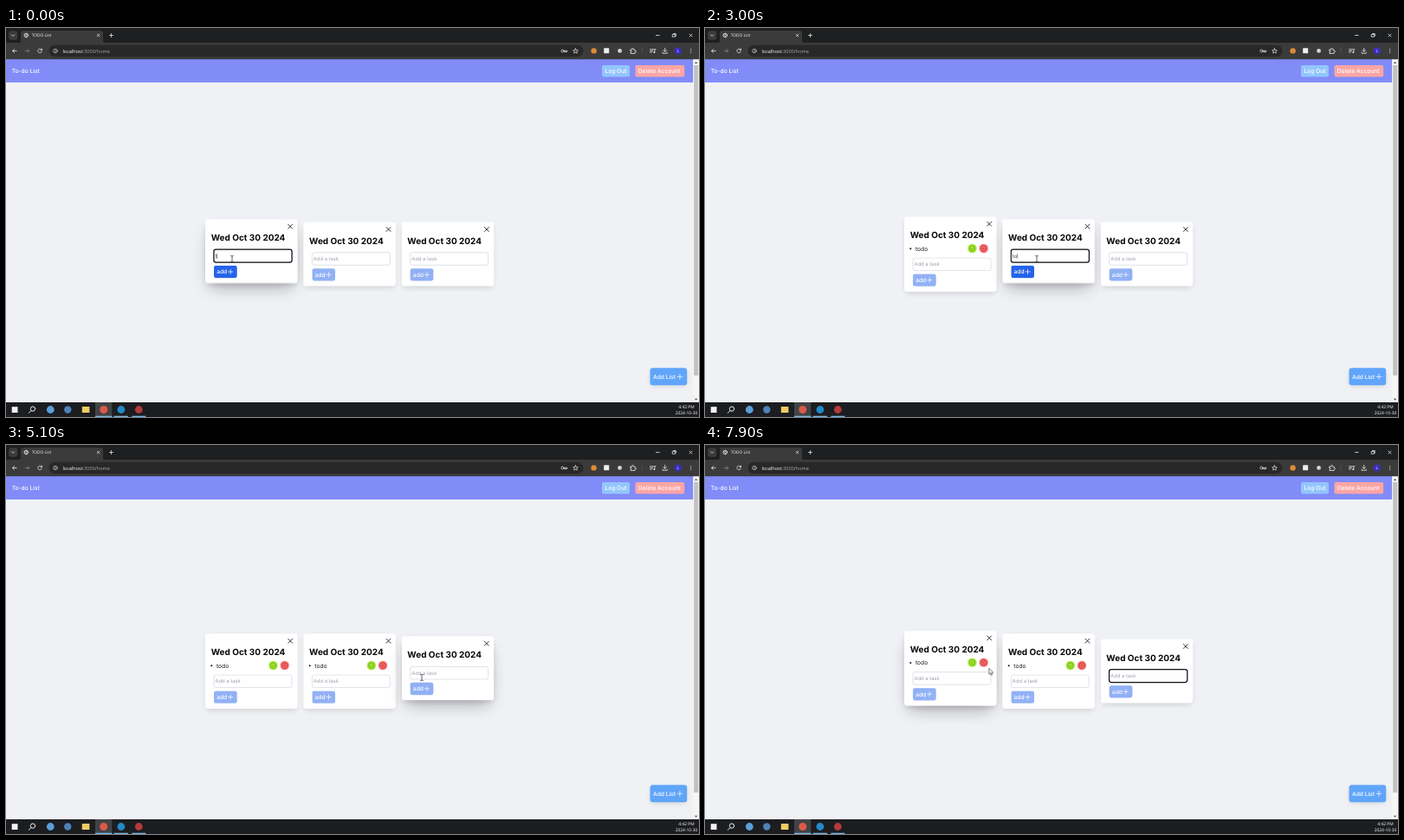
Recreate the animation shown at these times as an HTML page. Size 800 by 450 pixels, loop 8 s.

```html
<!DOCTYPE html>
<html lang="en">
<head>
<meta charset="utf-8">
<title>TODO List</title>
<style>
html, body { margin: 0; width: 100%; height: 100%; overflow: hidden; background: #eff1f5; }
svg { display: block; width: 800px; height: 450px; }
text { font: 500 6.67px Inter, sans-serif; fill: #fff; text-rendering: geometricPrecision; }
.ui text { font: 5px "Open Sans", sans-serif; }
.ui .url { font-size: 5.56px; }
.line { fill: none; stroke: #e8e8e8; stroke-width: .8; stroke-linecap: round; stroke-linejoin: round; }
.title { font-size: 10px; font-weight: 700; fill: #08080c; }
.hint, .typed { font-size: 5.83px; font-weight: 400; fill: #9ca3af; }
.typed { fill: #3a3f48; }
.item text { fill: #15151a; font-weight: 400; }
.soft { filter: blur(3px); opacity: .13; }
.deep { filter: blur(9.5px); opacity: .27; }
.cross { fill: none; stroke: #111; stroke-width: .85; }
.plus { fill: none; stroke: #fff; stroke-width: .7; }
.hidden { visibility: hidden; }
</style>
</head>
<body>
<svg viewBox="0 0 800 450">
  <rect width="800" height="450" fill="#eff1f5"/>

  <!-- page header -->
  <rect y="36" width="793.3" height="27" fill="#818cf8"/>
  <text x="6.7" y="52.1">To-do List</text>
  <rect x="688" y="43" width="32" height="13.5" rx="2" fill="#93c5fd"/>
  <text x="691.4" y="52.1" font-weight="600">Log Out</text>
  <rect x="726.5" y="43" width="56.7" height="13.5" rx="2" fill="#fca5a5"/>
  <text x="729.8" y="52.1" font-weight="600">Delete Account</text>

  <g id="cards"></g>

  <rect x="744.5" y="397" width="41" height="17" rx="3" class="soft"/>
  <rect x="743.5" y="393.3" width="42.7" height="20" rx="3" fill="#60a5fa"/>
  <text x="747" y="405.8">Add List</text>
  <path class="plus" d="M774.6 403.3h6.6m-3.3-3.3v6.6"/>

  <!-- scrollbar -->
  <rect x="793.3" y="36" width="6.7" height="397" fill="#f5f5f5"/>
  <rect x="794.2" y="43" width="5" height="359" fill="#c1c1c1"/>
  <path d="M794.8 41h3.6l-1.8-2zM794.8 428.8h3.6l-1.8 2z" fill="#555"/>

  <!-- browser frame -->
  <g class="ui">
    <rect width="800" height="18" fill="#1e1f20"/>
    <rect x="3" y="3.3" width="10.4" height="10.4" rx="3" fill="#3b3b3c"/>
    <path class="line" d="M6.6 7.8l1.6 1.6 1.6-1.6"/>
    <path d="M14 17.5q3-.2 3-3v-8.500q0-3 3-3h89q3 0 3 3v8.500q0 2.800 3 3z" fill="#3b3b3c"/>
    <g class="line" stroke-width=".7">
      <circle cx="23.300" cy="8.500" r="2.300"/>
      <path d="M21.200 7.700l2 1 .4 1.800m-.4-4.200l.6 1.500 1.500.2"/>
    </g>
    <text x="29.800" y="10.300" style="font-size:4.800px">TODO List</text>
    <path class="line" d="M105.300 7.200l2.600 2.600m0-2.600l-2.600 2.600M119.500 8.500h4m-2-2v4"/>
    <path class="line" d="M750.500 8.500h3.600M789 7l3 3m0-3l-3 3M769.600 7.400h2.800v2.800h-2.800zM770.500 6.500h2.800v2.800"/>

    <rect y="17" width="800" height="19.200" fill="#3b3b3c"/>
    <rect x="49.500" y="19.700" width="617" height="13.600" rx="6.800" fill="#282829"/>
    <path class="line" d="M12.200 26.500h-4.600m2-2l-2 2 2 2M41.200 25.300a2.300 2.300 0 1 0 .1 2m.2-3.200v1.500h-1.500"/>
    <path class="line" style="stroke:#858585" d="M22.200 26.500h4.600m-2-2l2 2-2 2"/>
    <circle class="line" cx="57" cy="26.500" r="2.300" style="stroke-width:.6"/>
    <path class="line" style="stroke-width:.6" d="M57 26.300v1.300m0-2.400v.1"/>
    <text class="url" x="65.400" y="28.500">localhost<tspan fill="#a9a9a9">:3000/home</tspan></text>

    <g class="line" style="stroke-width:.7">
      <circle cx="642.300" cy="26.500" r="1.500"/>
      <path d="M643.900 26.200h4v1.200h-4m2 0v.8"/>
      <path d="M657.500 23.700l.8 1.900 2 .2-1.500 1.300.5 2-1.800-1-1.800 1 .5-2-1.500-1.300 2-.2z"/>
    </g>
    <circle cx="678.600" cy="26.400" r="3.200" fill="#dd8b38"/>
    <rect x="690.200" y="23.300" width="6" height="6" rx=".6" fill="#eee"/>
    <circle cx="708.600" cy="26.400" r="2.400" fill="#d6d6d6"/>
    <path class="line" d="M721 25h1.700q-.3-1.600.8-1.600t.8 1.600h1.700v1.400q1.400-.2 1.400.9t-1.400.9v1.300h-5v-1.500q1.300 0 1.300-.8t-1.300-.8z"/>
    <path d="M734.300 23v7" stroke="#68686a" stroke-width=".5"/>
    <path class="line" d="M743.600 24.700h4m-4 1.700h3m-3 1.700h1.800m3.500-3.400v3.400m0-3.400h1"/>
    <circle cx="748.200" cy="28.200" r=".9" fill="#e8e8e8"/>
    <path class="line" d="M760.700 23.300v4m-1.800-1.700l1.800 1.800 1.800-1.800m-4.400 2.500v1.200h5.200v-1.200"/>
    <circle cx="775.700" cy="26.400" r="3.900" fill="#3b2fc4"/>
    <text x="774.600" y="28.100" style="font-size:4.500px">L</text>
    <path d="M790.700 24.300v.01m0 2.100v.01m0 2.100v.01" stroke="#eee" stroke-width="1.100" stroke-linecap="round"/>

    <!-- taskbar -->
    <rect y="433" width="800" height="17" fill="#1c1d20"/>
    <rect x="103" y="433" width="19.300" height="17" fill="#414346"/>
    <path d="M103 449.300h19.300M124.500 449.300h16.500M145.500 449.300h15.800" stroke="#76b9ed" stroke-width="1.200"/>
    <rect x="6.700" y="438.200" width="6.800" height="6.800" fill="#f2f2f2"/>
    <circle class="line" cx="31" cy="440.600" r="2.700" style="stroke-width:1"/>
    <path class="line" d="M29 442.600l-2.600 2.700" style="stroke-width:1"/>
    <circle cx="51.300" cy="441.500" r="4.400" fill="#5b9fd8"/>
    <circle cx="71.300" cy="441.500" r="4.200" fill="#4f81b8"/>
    <rect x="87.800" y="438" width="8.600" height="7" fill="#f1cc65"/>
    <circle cx="112.800" cy="441.500" r="4.500" fill="#dc5a49"/>
    <circle cx="132.900" cy="441.500" r="4.400" fill="#2489ca"/>
    <circle cx="153.300" cy="441.500" r="4.400" fill="#b53a3b"/>
    <text x="785.500" y="439.700" text-anchor="middle" style="font-size:4.900px">4:42 PM</text>
    <text x="785.500" y="447.300" text-anchor="middle" style="font-size:4.900px">2024-10-30</text>
  </g>

  <g id="pointer">
    <g id="beam" fill="none" stroke-linecap="round">
      <path d="M-1.500-3.700q1.500 0 1.500.8v5.800q0 .8-1.500.8m3-7.400q-1.500 0-1.500.8m0 5.800q0 .8 1.500.8" stroke="#33343a" stroke-width=".75"/>
    </g>
    <path id="hand" class="hidden" fill="#fff" stroke="#15151a" stroke-width=".65" stroke-linejoin="round"
      d="M-.8.600Q0-.600.800.600V3.300L2.100 3.500 3.400 3.900 4.500 4.500V6.500L3.500 9H-.700L-2.900 5.700Q-2.700 4.400-.800 5.800Z"/>
    <path id="arrow" class="hidden" fill="#fff" stroke="#222" stroke-width=".6" stroke-linejoin="round"
      d="M0 0V7.100L1.600 5.600 2.700 8.100 3.800 7.600 2.800 5.200H5Z"/>
  </g>
</svg>
<script>
const LOOP = 8000, GROW = 6.3, RAISED = -3.33;
const SMOOTH = 'cubic-bezier(.4,0,.2,1)';
const rules = [];

// points: [ms, value] pairs; the last value is held until the loop restarts
function track(sel, prop, points, easing = SMOOTH) {
  const name = 'k' + rules.length;
  const keys = [...points, [LOOP, points.at(-1)[1]]];
  const body = keys.map(([t, v]) => `${t / LOOP * 100}%{${prop}:${v}}`).join('');
  rules.push(`@keyframes ${name}{${body}}${sel}{animation:${name} ${LOOP}ms ${easing} infinite}`);
}

// visible first or not, then toggled at each given time
function toggle(sel, on, ...times) {
  const state = v => v ? 'visible' : 'hidden';
  track(sel, 'visibility', [[0, state(on)], ...times.map(t => [t, state(on = !on)])], 'step-end');
}

const slide = (sel, points, easing) =>
  track(sel, 'transform', points.map(([t, x, y]) => [t, `translate(${x}px,${y}px)`]), easing);

// value changes as [start, end, value] moves from a first value
function moves(first, list) {
  const points = [[0, first]];
  for (const [from, to, value] of list) {
    points.push([from, points.at(-1)[1]], [to, value]);
  }
  return points;
}

const shell = (cls, y, h) => `<g class="${cls}">
  <rect class="soft" x="1.200" y="${y + 4}" width="104.300" height="${h - 2}" rx="4"/>
  <g class="glow"><rect class="deep" x="5" y="${y + 15.4}" width="96.700" height="${h - 10}" rx="4"/></g>
  <rect y="${y}" width="106.670" height="${h}" rx="3.400" fill="#fff"/></g>`;

const badge = (x, fill, ink, mark) => `<circle cx="${x}" cy="255" r="5.200" fill="${fill}"/>
  <g fill="none" stroke="${ink}" stroke-width=".65"><circle cx="${x}" cy="255" r="3.100"/><path d="M${x} 255${mark}"/></g>`;

const card = n => `<g transform="translate(${230 + 113.333 * (n - 1)},0)"><g id="c${n}">
  ${shell('short', 224.6, 74)}${shell('tall hidden', 224.6 - GROW, 74 + 2 * GROW)}
  <g class="top">
    <path class="cross" d="M95.400 230.200l5.500 5.500m0-5.500l-5.500 5.500"/>
    <text class="title" x="6.700" y="249.700">Wed Oct 30 2024</text>
  </g>
  <g class="item hidden">
    <circle cx="7.300" cy="255.300" r="1.050" fill="#15151a"/>
    <text x="13" y="257.500">todo</text>
    ${badge(78.5, '#a3e635', '#5f9f13', 'm-1.400 0l1 1.100 1.900-2')}
    ${badge(91.7, '#f87171', '#b3262b', 'm-1.200-1.200l2.400 2.400m0-2.400l-2.400 2.400')}
  </g>
  <g class="bottom">
    <rect x="10" y="259.700" width="90" height="14.600" rx="2.400" fill="#fff" stroke="#d3d6dd" stroke-width=".7"/>
    <rect class="ring hidden" x="9.900" y="259.500" width="90.200" height="15" rx="2.400" fill="none" stroke="#111216" stroke-width="1.250"/>
    <text class="hint" x="11.500" y="269.200">Add a task</text>
    <text class="typed" x="11.500" y="269.200">${[...'todo'].map((c, i) => `<tspan class="l${i} hidden">${c}</tspan>`).join('')}</text>
    <g class="caret"><path class="bar hidden" d="M11.700 264.200v6" stroke="#111" stroke-width=".55"/></g>
    <g class="btn" opacity=".5">
      <rect class="face" x="10" y="278.200" width="26.700" height="14.300" rx="2.400" fill="#2563eb"/>
      <text x="13.200" y="287.700">add</text>
      <path class="plus" d="M26.200 285.300h6m-3-3v6"/>
    </g>
  </g></g></g>`;

document.getElementById('cards').innerHTML = [1, 2, 3].map(card).join('');

function hover(n, first, list) {
  slide('#c' + n, moves(first, list).map(([t, v]) => [t, 0, v * RAISED]));
  track(`#c${n} .glow`, 'opacity', moves(first, list));
}
hover(1, 1, [[1950, 2250, 0], [7200, 7500, 1]]);
hover(2, 0, [[1980, 2280, 1], [4700, 5000, 0], [6800, 7100, 1], [7150, 7450, 0]]);
hover(3, 0, [[4750, 5050, 1], [6770, 7070, 0]]);

// typing the four letters, then the finished task joins the list
function fill(n, keys, caretOff, added) {
  const c = '#c' + n + ' ';
  keys.forEach((t, i) => t ? toggle(`${c}.l${i}`, false, t, added) : toggle(`${c}.l${i}`, true, added));
  const stops = keys.map((t, i) => [t, [2.1, 5.6, 9.2, 12.7][i], 0]);
  slide(c + '.caret', keys[0] ? [[0, 0, 0], ...stops] : stops, 'step-end');
  if (keys[0]) toggle(c + '.bar', false, keys[0], caretOff);
  else toggle(c + '.bar', true, caretOff);
  if (keys[0]) toggle(c + '.hint', true, keys[0], added);
  else toggle(c + '.hint', false, added);
  toggle(c + '.short', true, added);
  toggle(c + '.tall', false, added);
  toggle(c + '.item', false, added);
  slide(c + '.top', [[0, 0, 0], [added, 0, -GROW]], 'step-end');
  slide(c + '.bottom', [[0, 0, 0], [added, 0, GROW]], 'step-end');
}
fill(1, [0, 300, 600, 700], 1100, 1900);
fill(2, [2800, 3000, 3100, 3200], 3400, 4500);

toggle('#c1 .ring', true, 1500);
toggle('#c2 .ring', false, 2300, 4250);
toggle('#c3 .ring', false, 6100);

track('#c1 .btn', 'opacity', moves(1, [[1900, 2050, .5]]));
track('#c2 .btn', 'opacity', moves(.5, [[2800, 2950, 1], [4500, 4650, .5]]));
const BLUE = '#2563eb', NAVY = '#1d4ed8';
track('#c1 .face', 'fill', moves(BLUE, [[1430, 1580, NAVY], [1900, 2050, BLUE]]));
track('#c2 .face', 'fill', moves(BLUE, [[3920, 4070, NAVY], [4500, 4650, BLUE]]));

slide('#pointer', [
  [0, 261, 267], [1050, 261, 267], [1100, 260, 267.5], [1300, 260, 267.5],
  [1550, 256, 277.5], [1900, 256, 277.5], [2200, 383, 267], [3800, 383, 267],
  [4050, 358, 286.3], [4500, 358, 286.3], [4950, 480, 269], [6680, 480, 269],
  [6790, 453, 267.5], [7000, 352.8, 263.5], [7200, 336, 261.5], [7450, 327.8, 258.2]
], 'ease-in-out');
toggle('#beam', true, 1420, 2080, 3920, 4860, 6720);
toggle('#hand', false, 1420, 1900, 3920, 4500);
toggle('#arrow', false, 1900, 2080, 4500, 4860, 6720);

const sheet = document.createElement('style');
sheet.textContent = rules.join('\n');
document.head.append(sheet);
</script>
</body>
</html>
```
